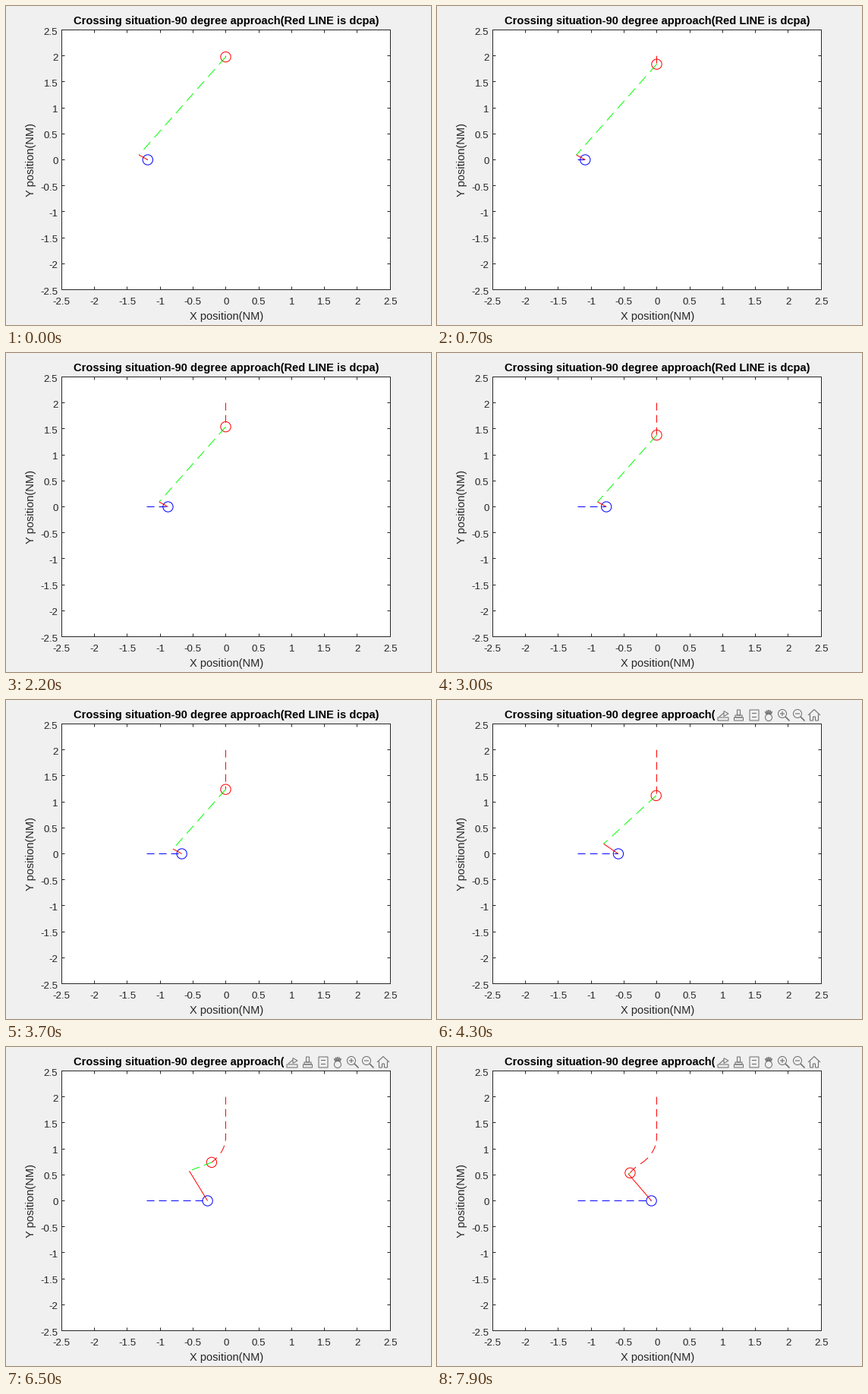
A matplotlib script for the animation above (8 s loop, 560 by 420 pixels).

```python
import numpy as np
import matplotlib.pyplot as plt
from matplotlib.animation import FuncAnimation
from matplotlib.patches import Circle, Rectangle, RegularPolygon

W, H, DPI = 560, 420, 96
FRAMES, STEP_MS = 80, 100
PX = 72 / DPI  # one pixel in points
LEFT, RIGHT, TOP, BOTTOM = 73.5, 506.5, 31.5, 373.5
X_UNIT, Y_UNIT = (RIGHT - LEFT) / 5, (BOTTOM - TOP) / 5
X0, Y0 = 289.5, 202.5
TICK = 4
BACK, INK, ICON = "#f0f0f0", "#262626", "#6e6e6e"

plt.rcParams["font.family"] = "Liberation Sans"
fig = plt.figure(figsize=(W / DPI, H / DPI), dpi=DPI, facecolor=BACK)
ax = fig.add_axes([0, 0, 1, 1])
ax.set_xlim(0, W)
ax.set_ylim(H, 0)
ax.axis("off")


def line(xs, ys, color, z=3, width=1):
    art, = ax.plot(xs, ys, color=color, lw=width * PX, zorder=z, snap=False,
                   solid_capstyle="butt", solid_joinstyle="round")
    return art


def outline(shape, color, z=4):
    shape.set(fill=False, ec=color, lw=PX, zorder=z, snap=False)
    return ax.add_patch(shape)


def ring(x, y, r, color, z=4):
    return outline(Circle((x, y), r), color, z)


def label(x, y, s, size=10, color=INK, **kw):
    kw = {"ha": "center", "va": "baseline", **kw}
    ax.text(x, y, s, fontsize=size, color=color, **kw)


def to_px(x, y):
    return X0 + X_UNIT * np.asarray(x), Y0 - Y_UNIT * np.asarray(y)


def draw_frame():
    ax.add_patch(Rectangle((LEFT, TOP), RIGHT - LEFT, BOTTOM - TOP, fc="white",
                           ec="none", zorder=0))
    outline(Rectangle((LEFT, TOP), RIGHT - LEFT, BOTTOM - TOP), INK, 2)
    for v in np.linspace(-2.5, 2.5, 11):
        tx, ty = X0 + 0.2 + X_UNIT * v, Y0 - Y_UNIT * v
        sx, sy = np.floor(tx) + 0.5, np.floor(ty) + 0.5
        for edge, d in ((BOTTOM, -TICK), (TOP, TICK)):
            line([sx, sx], [edge, edge + d], INK, 2)
        for edge, d in ((LEFT, TICK), (RIGHT, -TICK)):
            line([edge, edge + d], [sy, sy], INK, 2)
        label(tx, 393, f"{v:g}")
        label(68.5, ty + 6, f"{v:g}", ha="right")
    label(290.5, 413, "X position(NM)", 11)
    label(32.5, Y0, "Y position(NM)", 11, va="center", rotation=90)
    label(290, 24, "Crossing situation-90 degree approach(Red LINE is dcpa)",
          11, "black", weight="bold")


def make_toolbar():
    cover = Rectangle((366, 9), 141, 21.5, fc=BACK, ec="none", zorder=5)
    parts = [ax.add_patch(cover)]
    export, brush, tip, hand, zoom_in, zoom_out, home = np.linspace(377, 497, 7)
    mid = 20

    def bar(cx, x1, y1, x2, y2, width=1.1):
        parts.append(line([cx + x1, cx + x2], [mid + y1, mid + y2], ICON, 6,
                          width))

    def box(cx, x, y, w, h):
        parts.append(outline(Rectangle((cx + x, mid + y), w, h), ICON, 6))

    def triangle(cx, dx, r, turn):
        shape = RegularPolygon((cx + dx, mid - 2), 3, radius=r,
                               orientation=turn)
        parts.append(outline(shape, ICON, 6))

    # tray with an arrow
    box(export, -7, 3, 14, 4)
    bar(export, -5, 2, 1, -3)
    triangle(export, 3, 4, -np.pi / 2)

    # handle and bristles
    box(brush, -1.5, -7, 4, 7)
    box(brush, -4, 0, 9, 3)
    box(brush, -5.5, 3, 12, 4)

    # note with two lines of text
    box(tip, -5, -7, 12, 14)
    for y in (-2.5, 2.5):
        bar(tip, -2, y, 4, y)

    # fingers over a palm
    parts.append(outline(Circle((hand, mid + 3), 4.5), ICON, 6))
    for a in np.linspace(-0.7, 0.7, 5):
        bar(hand, 4 * np.sin(a), -1, 7 * np.sin(a), 2 - 9 * np.cos(a), 1.6)

    for cx in (zoom_in, zoom_out):
        parts.append(ring(cx - 2, mid - 2, 5.5, ICON, 6))
        bar(cx, 2, 2, 7.5, 7.5, 1.6)
        bar(cx, -5, -2, 1, -2)
    bar(zoom_in, -2, -5, -2, 1)

    # roof, walls and door
    for side in (-1, 1):
        bar(home, 0, -7.5, 8 * side, 0)
        bar(home, 5.5 * side, -1.5, 5.5 * side, 7)
        bar(home, 1.5 * side, 2, 1.5 * side, 7)
        bar(home, 5.5 * side, 7, 1.5 * side, 7)
    bar(home, -1.5, 2, 1.5, 2)
    return parts


draw_frame()
toolbar = make_toolbar()

# Own ship sails east; the other turns to starboard, then back
SPEED_OWN, SPEED_OTHER = 0.014, 0.02
step = np.arange(FRAMES)
turn = 0.03 * np.maximum(0, 30 - abs(step - 68))
vel = SPEED_OTHER * np.stack([-np.sin(turn), -np.cos(turn)], axis=1)
other = np.vstack([[0, 2], [0, 2] + np.cumsum(vel, axis=0)])
own = np.stack([-1.2 + SPEED_OWN * np.arange(FRAMES + 1),
                np.zeros(FRAMES + 1)], axis=1)


def dashed(pts, on=10, period=16):
    """Cut a path into dashes measured along each segment's longer axis."""
    x, y = to_px(pts[:, 0], pts[:, 1])
    s = np.append(0, np.cumsum(np.maximum(abs(np.diff(x)), abs(np.diff(y)))))
    xs, ys = [], []
    for a in np.arange(0, s[-1], period):
        b = min(a + on, s[-1])
        t = np.concatenate([[a], s[(s > a) & (s < b)], [b]])
        xs += [*np.interp(t, s, x), np.nan]
        ys += [*np.interp(t, s, y), np.nan]
    return xs, ys


own_trail = line([], [], "blue")
other_trail = line([], [], "red")
own_ship = ring(0, 0, 6.67, "blue")
other_ship = ring(0, 0, 6.67, "red")
course = line([], [], "lime", 4)
dcpa = line([], [], "red", 4)


def update(n):
    p, q = own[n + 1], other[n + 1]
    rel_v = vel[n] - [SPEED_OWN, 0]
    tcpa = -np.dot(q - p, rel_v) / np.dot(rel_v, rel_v)
    cpa = q + rel_v * tcpa
    own_trail.set_data(*dashed(own[:n + 2]))
    other_trail.set_data(*dashed(other[:n + 2]))
    course.set_data(*dashed(np.array([q, cpa])))
    dcpa.set_data(*to_px([p[0], cpa[0]], [p[1], cpa[1]]))
    own_ship.center = to_px(*p)
    other_ship.center = to_px(*q)
    for part in toolbar:
        part.set_visible(2 <= n < 6 or n >= 40)
    return []


anim = FuncAnimation(fig, update, frames=FRAMES, interval=STEP_MS, repeat=True,
                     repeat_delay=0)
plt.show()
```
